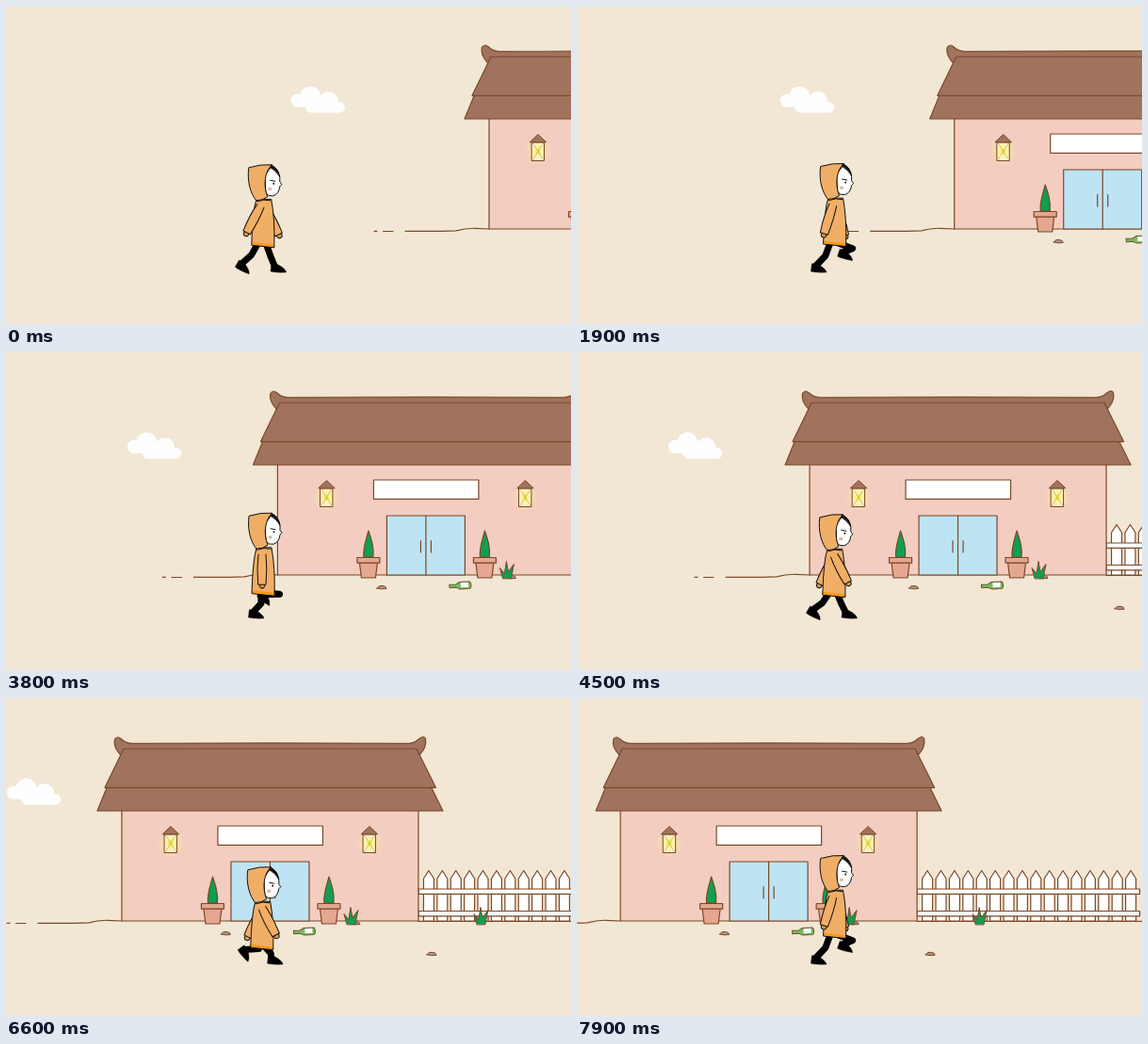
Recreate the animation shown at these times as an HTML page with a canvas. Size 600x338 px, loop 8 s.

```html
<!DOCTYPE html>
<html lang="en">
<head>
<meta charset="utf-8">
<title>Evening walk</title>
<style>
html, body { margin: 0; width: 100%; height: 100%; overflow: hidden; background: #f2e7d5; }
canvas { display: block; }
</style>
</head>
<body>
<canvas id="stage" width="600" height="338"></canvas>
<script>
const c = document.getElementById('stage').getContext('2d');
const LOOP = 8000, STEP = 100, CYCLE = 1000, TURN = 2 * Math.PI;
const BG = '#f2e7d5', BROWN = '#7b4828', ROOF = '#a1735e', ORANGE = '#f1ae66', INK = '#111';
const GREEN = '#0f9f51', CLAY = '#e5a78f', WHITE = '#fefefe';
const { sin, cos, max } = Math;
c.lineJoin = c.lineCap = 'round';

function draw(d, fill, stroke, width = 1.2) {
  const p = new Path2D(d);
  if (fill) { c.fillStyle = fill; c.fill(p); }
  if (stroke) { c.strokeStyle = stroke; c.lineWidth = width; c.stroke(p); }
}
const rect = (x, y, w, h, fill) => draw(`M${x},${y}h${w}v${h}h${-w}Z`, fill, BROWN);
function at(x, y, fn, angle = 0) {
  c.save();
  c.translate(x, y);
  c.rotate(angle);
  fn();
  c.restore();
}
function disc(x, y, rx, ry, fill, stroke) {
  c.beginPath();
  c.ellipse(x, y, rx, ry, 0, 0, TURN);
  c.fillStyle = fill;
  c.fill();
  if (stroke) { c.strokeStyle = stroke; c.lineWidth = 1; c.stroke(); }
}

function cloud() {
  disc(309.5, 100.5, 7, 7, WHITE);
  disc(323, 96.5, 11, 11, WHITE);
  disc(342.5, 101.5, 10.5, 10.5, WHITE);
  disc(354.2, 107.8, 5.7, 5.7, WHITE);
  draw('M309,107.5H318Q319,113.5 325,113.5H354V104L325,95L309,98Z', WHITE);
}

function lamp() {
  const glow = c.createRadialGradient(0, 18, 2, 0, 18, 15);
  glow.addColorStop(0, 'rgba(255,240,130,.7)');
  glow.addColorStop(1, 'rgba(255,240,160,0)');
  draw('M-6.5,9H6.5V28.5H-6.5Z', '#fdf3d6');
  c.fillStyle = glow;
  c.fillRect(-15, 3, 30, 30);
  disc(0, 18.5, 2.5, 3.5, '#f6ee50');
  draw('M-6,9L6,28M6,9L-6,28', null, '#b99a5c', .6);
  draw('M-6.5,9H6.5V28.5H-6.5Z', null, BROWN, 1);
  draw('M-8.5,8.5L0,0.5L8.5,8.5Z', ROOF, BROWN, 1);
}

function pot() {
  draw('M-5,28C-6,17 -2,9 0,0C3,9 6,17 5,28Z', GREEN, BROWN);
  draw('M-9.5,34H9.5L7.5,50H-7.5Z', CLAY, BROWN);
  rect(-12, 28.5, 24, 5.7, CLAY);
}

const grass = () =>
  draw('M3,0L0,-11L5,-5L7,-18L9,-7L15,-15L12,0Z', GREEN, BROWN, 1);
const stone = (x, y) =>
  draw(`M${x - 5},${y + 1}q2,-3.5 6,-2.5q4,.5 4,3q-5,1 -10,-.5Z`, '#b5958a', BROWN, 1);

function bottle() {
  draw('M-11,-1.6H-4L0,-3.8H10Q12,-3.5 12,0Q12,3.5 10,3.8H0L-4,1.8H-11Z', '#6fbf62', BROWN, 1);
  draw('M1,-3H9V2H1Z', '#fff');
}

function fence() {
  for (let i = 0; i < 16; i++)
    draw(`M${567.5 + i * 14.4},237V192l5.5,-8.5l5.5,8.5V237Z`, '#fff', BROWN);
  for (const y of [203, 226.5]) rect(562, y, 236.5, 5.3, '#fff');
}

function street() {
  draw('M125,239.3H128M134.500,239.500H145M158,239.300Q190,239.800 212,238.800Q222,236 232,236.300L247,237M562,237.300H850', null, BROWN);
  fence();
  rect(247, 112, 315, 125, '#f3cdc0');
  draw('M231,95.500L221,120H588L576,95.500Z', ROOF, BROWN);
  draw('M247,62C241,56 238,50 239.500,44Q242,39.500 247,44Q251,48 258,48.300Q405,47.500 551,48.300Q558,48 562,44Q567,39.500 569.500,43C571,50 568,56 562,62Z', ROOF, BROWN);
  draw('M249,54H560L580.500,95.300H229Z', ROOF, BROWN);
  rect(349, 136, 111.5, 20.3, '#fff');
  rect(363, 174, 83, 63, '#bee4f3');
  draw('M404.500,174V237M399,200.500V213M410,200.500V213', null, BROWN);
  for (const x of [299, 510]) at(x, 136, lamp);
  for (const x of [343.5, 467]) at(x, 190, pot);
  stone(495, 239);
  for (const x of [483, 621]) at(x, 240.5, grass);
  at(440.5, 248.3, bottle, -.06);
  stone(357.5, 250);
  stone(576, 271.8);
}

// Foot sweeps back on the ground, then swings forward through the air.
function leg(p, dx, dy) {
  p %= 1;
  const swing = max(0, (p - .45) / .57);
  const lift = 18 * sin(Math.PI * swing) * (.4 + 1.2 * swing);
  const pitch = .87 * sin(3.5 * swing ** .8);
  const ankleX = 267.5 + 18 * cos(TURN * p), ankleY = 277 - lift;
  const hipX = 271 + dx + (ankleX - 267.5) / 4, hipY = 252 + dy;
  const bend = .9 * lift + max(0, 5 * sin(TURN * p));
  const kneeX = (hipX + ankleX) / 2 + bend, kneeY = (hipY + ankleY) / 2 + 1;
  draw(`M${hipX},${hipY}L${kneeX},${kneeY}L${ankleX},${ankleY}`, null, '#000', 7);
  at(ankleX, ankleY, () => draw('M-3.500,-3L-4.500,5Q0,6.500 12,6Q11,2 3.500,-2Z', '#000', '#000', .5), pitch);
}

function arm(x, y, swing) {
  const len = 35, mid = len / 2;
  at(x, y, () => {
    disc(len + 1, 0, 3, 2.8, '#dd984f', INK);
    const edge = `M3,4Q${mid},6 ${len},4.300V-4Q${mid},-5.500 3,-4`;
    draw(edge, ORANGE);
    draw(edge, null, INK, 1);
  }, TURN / 4 - swing);
}

function torso() {
  const coat = 'M265,205Q261,217 260,253.500L284,256Q285,226 281,205Z';
  draw(coat, ORANGE);
  draw('M261,251.500L283.500,254', null, '#fb9818', 2.6);
  draw(coat, null, INK, 1);
}

function head() {
  draw('M282,169Q289,172 290,182L290,186L292,189L290,191Q289,199 283,201Q278,202 275,198L274,180Z', '#fff', INK, 1);
  draw('M265,206C259,199 255,186 257,171Q270,167 282,168C274,174 272,190 277,202Q272,206 265,206Z', ORANGE, INK, 1);
  draw('M281,168.500Q288,171 290,181Q286,174 280,171Z', INK, INK, .8);
  draw('M280,184.500L285,185.500', null, INK, 1);
  disc(283.5, 188, .9, 1.1, INK);
  disc(279.3, 193.5, 1.9, 1.6, '#f3cbb9');
  draw('M278.500,192.500V195M280.500,192.500V195', null, '#a87565', .5);
}

function walker(p) {
  const bob = cos(TURN * (2 * p - .28));
  // One stride stands taller than the other.
  const dx = .6 - bob, dy = 6.5 * bob + (p < .5 ? 2 : 6);
  const swing = .5 * cos(TURN * (p - .05));
  leg(p + .5, dx, dy);
  leg(p, dx, dy);
  at(dx, dy, () => {
    arm(273, 211, swing);
    torso();
    arm(271, 209, -swing);
    draw('M266,207Q273,204 280,206', null, INK, 1);
    head();
  });
}

function frame(now) {
  const ms = Math.floor(now % LOOP / STEP) * STEP, t = ms / 1000;
  c.fillStyle = BG;
  c.fillRect(0, 0, 600, 338);
  at(-45.7 * t, 0, cloud);
  at(266 - 59.1 * t, 0, street);
  walker(ms % CYCLE / CYCLE);
  requestAnimationFrame(frame);
}
requestAnimationFrame(frame);
</script>
</body>
</html>
```
